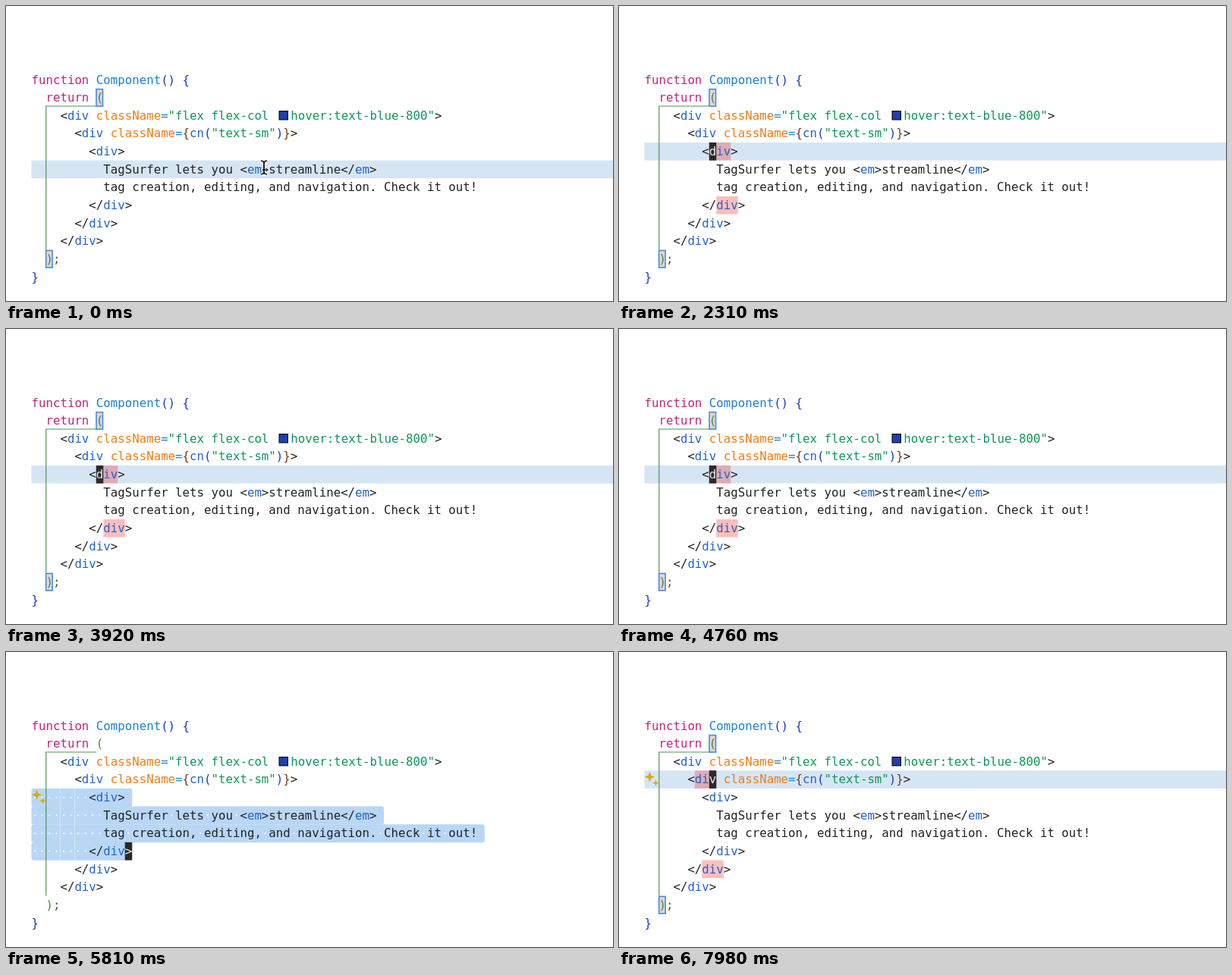
An HTML page with a canvas that plays this animation: 800 by 389 pixels, repeating every 8 s.

```html
<!DOCTYPE html>
<html lang="en">
<head>
<meta charset="utf-8">
<title>Tag navigation</title>
<style>
html, body { margin: 0; width: 100%; height: 100%; overflow: hidden; background: #fff }
canvas { display: block }
</style>
</head>
<body>
<canvas id="stage" width="800" height="389"></canvas>
<script>
const ctx = document.getElementById('stage').getContext('2d');
const LOOP = 8000, X0 = 33.5, Y0 = 85.4, W = 9.48, H = 23.64;

const colors = {
  k: '#c0237f', f: '#1c80d0', b: '#1b3bc4', g: '#3f8d45', t: '#2064c8',
  a: '#ee7d14', o: '#2186cf', s: '#0d9757', c: '#7a3813', x: '#222', d: '#555'
};

// Segments are split by "|"; the first letter of each is its colour.
const lines = [
  'kfunction |fComponent|b() {',
  'k  return |g(',
  'x    <|tdiv |aclassName|o=|s"flex flex-col ■hover:text-blue-800"|x>',
  'x      <|tdiv |aclassName|o=|c{|tcn|b(|s"text-sm"|b)|c}|x>',
  'x        <|tdiv|x>',
  'x          TagSurfer lets you <|tem|x>streamline</|tem|x>',
  'x          tag creation, editing, and navigation. Check it out!',
  'x        </|tdiv|x>',
  'x      </|tdiv|x>',
  'x    </|tdiv|x>',
  'g  )|d;',
  'b}'
].map(line => line.split('|').flatMap(part =>
  [...part.slice(1)].map(ch => ({ ch, color: colors[part[0]] }))));

// Tag names as [line, first column, length].
const em = [[5, 30, 2], [5, 45, 2]];
const inner = [[4, 9, 3], [7, 10, 3]];
const outer = [[3, 7, 3], [8, 8, 3]];

const steps = [
  { at: 0, line: 5, col: -1, mouse: true },
  { at: 630, line: 5, col: 30, tags: em },
  { at: 1750, line: 5, col: 44, tags: em },
  { at: 2100, line: 4, col: 9, tags: inner },
  { at: 2590, line: 7, col: 9, tags: inner },
  { at: 3430, line: 4, col: 9, tags: inner },
  { at: 4130, line: 7, col: 9, tags: inner },
  { at: 4690, line: 4, col: 9, tags: inner },
  { at: 4900, line: 4, col: 0, anchor: [4, 0] },
  { at: 5110, line: 7, col: 9, anchor: [4, 0] },
  { at: 5320, line: 7, col: 13, anchor: [4, 0], spark: 4 },
  { at: 6650, line: 4, col: 9, anchor: [4, 0], spark: 4 },
  { at: 6930, line: 3, col: 9, anchor: [4, 0], spark: 4 },
  { at: 7280, line: 3, col: 9, anchor: [4, 0], spark: 3 },
  { at: 7840, line: 3, col: 9, tags: outer, spark: 3 }
];

const colX = col => X0 + col * W;
const rowY = line => Y0 + line * H;

function cell(line, col, count, color) {
  ctx.fillStyle = color;
  ctx.fillRect(colX(col), rowY(line), count * W, H);
}

function path(color, width, points) {
  ctx.strokeStyle = color;
  ctx.lineWidth = width;
  ctx.beginPath();
  points.forEach(([x, y]) => ctx.lineTo(x, y));
  ctx.stroke();
}

function bracket(line, col) {
  cell(line, col, 1, '#e4d2d7');
  ctx.strokeStyle = '#3d8bdc';
  ctx.lineWidth = 1.5;
  ctx.strokeRect(colX(col) + .2, rowY(line) + .6, W - 1, H - 1.2);
}

function selection({ line, col, anchor }) {
  const [from, to] = [anchor, [line, col]].sort((p, q) => p[0] - q[0] || p[1] - q[1]);
  for (let n = from[0]; n <= to[0]; n++) {
    const start = n === from[0] ? from[1] : 0;
    const end = n === to[0] ? to[1] + 1 : lines[n].length + 1;
    ctx.fillStyle = '#b9d7f5';
    ctx.beginPath();
    ctx.roundRect(colX(start), rowY(n), (end - start) * W, H + .3, 3);
    ctx.fill();
    for (const guide of [4, 6]) if (n > 3 && start <= guide && guide < end)
      path('rgba(255,255,255,.4)', 1, [[colX(guide), rowY(n)], [colX(guide), rowY(n) + H]]);
    ctx.fillStyle = 'rgba(255,255,255,.85)';
    for (let c = start; c < end; c++) if (lines[n][c]?.ch === ' ') {
      ctx.beginPath();
      ctx.arc(colX(c + .5), rowY(n) + H / 2, 1.1, 0, 7);
      ctx.fill();
    }
  }
}

function code(line, cursorCol, n) {
  let x = X0;
  line.forEach(({ ch, color }, c) => {
    if (ch === '■') {
      ctx.fillStyle = '#111';
      ctx.fillRect(359.5, 138, 12.5, 12.5);
      ctx.fillStyle = '#1e40af';
      ctx.fillRect(360.7, 139.2, 10.1, 10.1);
      x += 19.5;
      return;
    }
    ctx.fillStyle = c === cursorCol ? '#eee' : color;
    ctx.fillText(ch, x, rowY(n) + 17.1);
    x += W;
  });
}

function star(x, y, r) {
  ctx.fillStyle = '#dba90f';
  ctx.beginPath();
  for (let i = 0; i < 8; i++) {
    const size = i % 2 ? r * .38 : r, angle = i * Math.PI / 4;
    ctx.lineTo(x + size * Math.cos(angle), y + size * Math.sin(angle));
  }
  ctx.fill();
}

function beam(x, y) {
  for (const [color, width] of [['#fff', 4], ['#111', 1.6]]) {
    for (const side of [-1, 1])
      path(color, width, [[4, -9], [1, -8], [0, -6], [0, 6], [1, 8], [4, 9]]
        .map(([dx, dy]) => [x + side * dx, y + dy]));
    path(color, width, [[x - 2, y + 3], [x + 2, y + 3]]);
  }
}

function draw(time) {
  const step = steps.findLast(s => s.at <= time);
  ctx.fillStyle = '#fff';
  ctx.fillRect(0, 0, 800, 389);
  if (step.anchor) selection(step);
  else {
    cell(step.line, 0, 90, '#d6e5f4');
    bracket(1, 9);
    bracket(10, 2);
  }
  path('#4d984f', 1.2, [[119, 132], [52.8, 132], [52.8, 321.5]]);
  for (const tag of step.tags || []) cell(...tag, 'rgba(255,0,0,.26)');
  if (step.col >= 0) cell(step.line, step.col, 1, '#2a2a2a');
  ctx.font = '15.75px "DejaVu Sans Mono", monospace';
  lines.forEach((line, n) => code(line, n === step.line ? step.col : -1, n));
  if (step.spark) {
    const y = rowY(step.spark) + H / 2;
    star(40.5, y - 3.5, 7);
    star(48.5, y + 4.5, 4.3);
  }
  if (step.mouse) beam(340, 213);
}

function tick(now) {
  draw(now % LOOP);
  requestAnimationFrame(tick);
}
draw(0);
requestAnimationFrame(tick);
</script>
</body>
</html>
```
